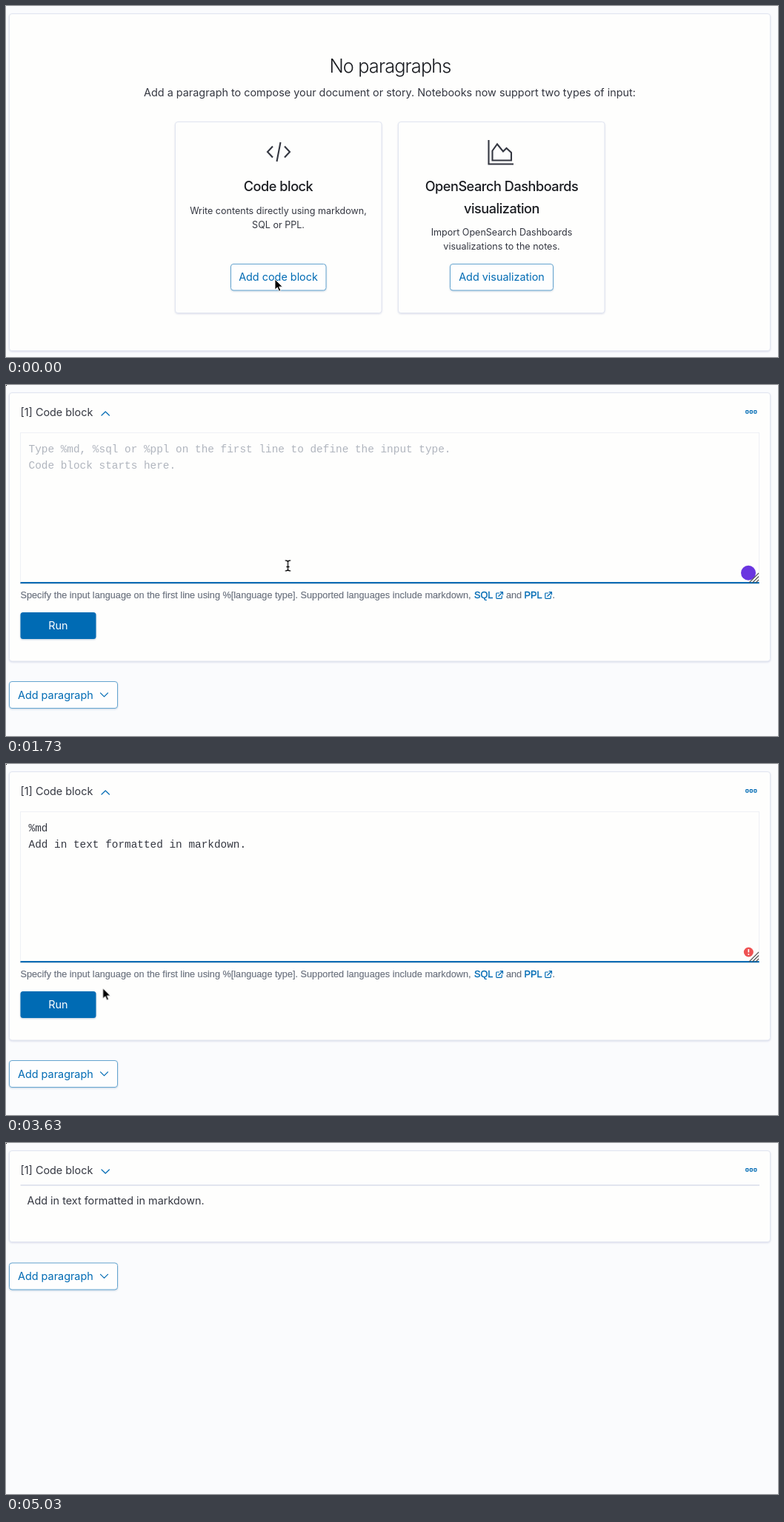
Recreate the animation shown at these times as an HTML page. Size 1042 by 474 pixels, loop 5.4 s.

```html
<!DOCTYPE html>
<html lang="en">
<head>
<meta charset="utf-8">
<title>Notebook code block</title>
<style>
  html, body { margin: 0; width: 100%; height: 100%; overflow: hidden; background: #fafbfd; }
  svg { display: block; width: 100%; height: 100%; }
  text { font: 14.4px Inter, sans-serif; font-optical-sizing: none; fill: #343741; }
  .mid { text-anchor: middle; }
  .title { font-size: 25.4px; font-weight: 300; letter-spacing: -.035em; fill: #1a1c21; }
  .head { font-size: 18.1px; font-weight: 500; letter-spacing: -.025em; fill: #1a1c21; }
  .small { font-size: 12.55px; }
  .help { font: 12.7px "Liberation Sans", Arial, sans-serif; fill: #69707d; stroke: #69707d; stroke-width: .15; }
  .link { fill: #006bb4; stroke: #006bb4; stroke-width: .4; }
  .blue { fill: #006bb4; }
  .code { font: 14.4px "Liberation Mono", "Courier New", monospace; }
  .panel { fill: #fefefd; stroke: #e1e5f0; filter: drop-shadow(0 1.5px 1px rgba(130, 135, 185, .28)); }
  .btn { fill: #fefefe; stroke: #66a5d0; filter: drop-shadow(0 1.5px 1px rgba(60, 110, 160, .28)); }
  .icon, .line { fill: none; stroke: #343741; stroke-width: 2.1; }
  .line { stroke: #006bb4; stroke-width: 1.2; stroke-linecap: round; stroke-linejoin: round; }

  /* One 5400 ms clock; 1% = 54 ms */
  .step, .flow { animation: 5400ms step-end infinite; }
  .flow { animation-timing-function: linear; }

  .intro { animation-name: intro; }
  .editor { animation-name: editor; }
  .result { animation-name: result; }
  @keyframes intro { 0% { opacity: 1 } 18.52%, 100% { opacity: 0 } }
  @keyframes editor { 0% { opacity: 0 } 18.52% { opacity: 1 } 81.85%, 100% { opacity: 0 } }
  @keyframes result { 0% { opacity: 0 } 81.85%, 100% { opacity: 1 } }
  .speck { animation-name: speck; }
  @keyframes speck { 0% { opacity: 0 } .55%, 100% { opacity: 1 } }

  .addLift { animation-name: addLift; }
  .addFill { animation-name: addFill; }
  .addText { animation-name: addText; }
  @keyframes addLift { 0%, 4.81% { transform: none } 8.5%, 100% { transform: translateY(-.8px) } }
  @keyframes addFill {
    0%, 4.81% { fill: #fefefe; filter: drop-shadow(0 1.5px 1px rgba(60, 110, 160, .28)) }
    8.5%, 100% { fill: #e6f0f8; filter: drop-shadow(0 3px 3px rgba(60, 110, 160, .32)) }
  }
  @keyframes addText { 0% { text-decoration-line: none } 4.81%, 100% { text-decoration-line: underline } }

  .runLift { animation-name: runLift; }
  .runFill { animation-name: runFill; fill: #006bb4; }
  .runText { animation-name: runText; fill: #fff; }
  @keyframes runLift { 0%, 68% { transform: none } 71%, 100% { transform: translateY(-.9px) } }
  @keyframes runFill {
    0%, 68% { fill: #006bb4; filter: drop-shadow(0 1.5px 1px rgba(40, 90, 150, .3)) }
    71%, 100% { fill: #005a98; filter: drop-shadow(0 3px 3px rgba(40, 90, 150, .4)) }
  }
  @keyframes runText { 0% { text-decoration-line: none } 68%, 100% { text-decoration-line: underline } }

  .focus { animation-name: focus; transform-origin: 19.5px 0; fill: #006bb4; }
  @keyframes focus {
    0% { transform: scaleX(0) } 19.6% { transform: scaleX(.0125) }
    21.48% { transform: scaleX(.45) } 22.5%, 100% { transform: none }
  }

  .hint { animation-name: hint; }
  .hint text { fill: #b0b5be; }
  @keyframes hint { 0% { opacity: 1 } 37.59%, 100% { opacity: 0 } }
  .key { fill: transparent; animation-name: key; }
  .key:nth-child(2) { animation-delay: 60ms; }
  .key:nth-child(3) { animation-delay: 120ms; }
  @keyframes key { 0% { fill: transparent } 37.59%, 100% { fill: #343741 } }
  .paste { animation-name: paste; }
  @keyframes paste { 0% { opacity: 0 } 51.11%, 100% { opacity: 1 } }

  .caret { fill: #30333a; animation-name: caretMove, caretBlink; }
  @keyframes caretMove {
    0% { transform: none }
    37.59% { transform: translate(8.6px, 0) }
    38.7% { transform: translate(17.3px, 0) }
    39.81% { transform: translate(25.9px, 0) }
    42.04% { transform: translate(0, 21.5px) }
    51.11%, 100% { transform: translate(294px, 21.5px) }
  }
  @keyframes caretBlink {
    0% { opacity: 1 } 28.3% { opacity: 0 } 37.59% { opacity: 1 }
    60.37% { opacity: 0 } 69.63% { opacity: 1 } 78.89%, 100% { opacity: 0 }
  }

  .badge { animation-name: badge; }
  .alert { animation-name: alert; }
  @keyframes badge { 0% { opacity: 0 } 23.15% { opacity: 1 } 59.26%, 100% { opacity: 0 } }
  @keyframes alert { 0% { opacity: 0 } 63.89%, 100% { opacity: 1 } }

  .pointer { animation-name: pointer; }
  @keyframes pointer {
    0%, 4.8% { transform: translate(363px, 369px) }
    5.9%, 15.37% { transform: translate(364px, 370.5px) }
    19.6%, 21.48% { transform: translate(374px, 362px) }
    29.63%, 32.96% { transform: translate(380.5px, 244px) }
    36.3%, 55.56% { transform: translate(309.5px, 144px) }
    62.96% { transform: translate(200px, 262px) }
    70.37%, 84.44% { transform: translate(80px, 332.5px) }
    92.59%, 100% { transform: translate(632px, -24px) }
  }
  .arrow { animation-name: arrow; }
  .hand { animation-name: hand; }
  .beam { animation-name: beam; }
  @keyframes arrow {
    0% { opacity: 1 } 4.81% { opacity: 0 } 18.52% { opacity: 1 } 27.8% { opacity: 0 }
    63.4% { opacity: 1 } 68% { opacity: 0 } 81.85%, 100% { opacity: 1 }
  }
  @keyframes hand {
    0% { opacity: 0 } 4.81% { opacity: 1 } 18.52% { opacity: 0 }
    68% { opacity: 1 } 81.85%, 100% { opacity: 0 }
  }
  @keyframes beam {
    0% { opacity: 0 } 27.8% { opacity: 1 } 37.59% { opacity: 0 }
    52.22% { opacity: 1 } 63.4%, 100% { opacity: 0 }
  }
</style>
</head>
<body>
<svg viewBox="0 0 1042 474">
  <defs>
    <g id="external" class="line">
      <path d="M4.5 2H1.5Q.8 2 .8 2.700V8.500Q.8 9.300 1.500 9.300H7.500Q8.300 9.300 8.300 8.500V5.800M3.800 6.300 9.500.700M6.200.700H9.500V4"/>
    </g>
    <g id="dots" class="line">
      <rect x="998.700" y="34.700" width="3.200" height="3.400" rx=".8"/>
      <rect x="1004.200" y="34.700" width="3.200" height="3.400" rx=".8"/>
      <rect x="1009.700" y="34.700" width="3.200" height="3.400" rx=".8"/>
    </g>
    <g id="addParagraph">
      <rect class="btn" x="4.500" y=".5" width="146" height="36" rx="3.500"/>
      <text class="blue" x="16" y="23.500">Add paragraph</text>
      <path class="line" d="M127.500 15.800l5 5 5-5"/>
    </g>
  </defs>

  <rect width="1042" height="474" fill="#fafbfd"/>

  <g class="step intro">
    <rect class="panel" x="4.500" y="10.500" width="1027" height="455" rx="3.500"/>
    <text class="mid title" x="518.500" y="89.500">No paragraphs</text>
    <text class="mid" x="518" y="121.500">Add a paragraph to compose your document or story. Notebooks now support two types of input:</text>

    <rect class="panel" x="228.500" y="156.500" width="278.500" height="258" rx="3.500"/>
    <path class="icon" d="M360 189.500l-7 7.500 7 7.500M376 189.500l7 7.500-7 7.500M370.500 184l-5 26"/>
    <text class="mid head" x="367.500" y="250">Code block</text>
    <text class="mid small" x="367.500" y="280.500">Write contents directly using markdown,</text>
    <text class="mid small" x="367.500" y="299.500">SQL or PPL.</text>
    <g class="flow addLift">
      <rect class="btn flow addFill" x="303.500" y="348.500" width="128.500" height="35.500" rx="3.500"/>
      <text class="mid blue step addText" x="367.500" y="371">Add code block</text>
    </g>

    <rect class="panel" x="529.500" y="156.500" width="278.500" height="258" rx="3.500"/>
    <path class="icon" d="M651.500 181v32.500h33.500M656.500 208.500v-13l6.500-9 8 10 4.500-4.500 6.500 6v10.500z"/>
    <text class="mid head" x="669" y="250">OpenSearch Dashboards</text>
    <text class="mid head" x="669" y="279.500">visualization</text>
    <text class="mid small" x="669" y="309.500">Import OpenSearch Dashboards</text>
    <text class="mid small" x="669" y="328.500">visualizations to the notes.</text>
    <rect class="btn" x="599.500" y="348.500" width="139" height="35.500" rx="3.500"/>
    <text class="mid blue" x="669" y="371">Add visualization</text>
  </g>

  <g class="step editor">
    <rect class="panel" x="4.500" y="10.500" width="1027" height="362.500" rx="3.500"/>
    <text x="19.500" y="42">[1] Code block</text>
    <path class="line" d="M129 41l5.200-5 5.200 5"/>
    <use href="#dots"/>

    <rect x="19.500" y="64.500" width="997" height="203.500" fill="#fefefd" stroke="#eef0f5"/>
    <path d="M19 268.300h998" stroke="#cdd2dc"/>
    <rect class="step focus" x="19.500" y="266" width="997" height="2"/>
    <g class="step hint">
      <text class="code" x="30.500" y="91">Type %md, %sql or %ppl on the first line to define the input type.</text>
      <text class="code" x="30.500" y="112.500">Code block starts here.</text>
    </g>
    <text class="code" x="30.500" y="91"><tspan class="step key">%</tspan><tspan class="step key">m</tspan><tspan class="step key">d</tspan></text>
    <text class="code step paste" x="30.500" y="112.500">Add in text formatted in markdown.</text>
    <rect class="step caret" x="30" y="78" width="1" height="17"/>

    <circle class="step badge" cx="1002" cy="253.700" r="10" fill="#6a35e0"/>
    <g class="step alert">
      <circle cx="1002.300" cy="254" r="6.500" fill="#ee5253"/>
      <path d="M1002.300 250v4.600M1002.300 256.300v1.700" stroke="#fff" stroke-width="1.700"/>
    </g>
    <path d="M1003 267l13-13M1007.500 267l8.500-8.500M1012 267l4-4" stroke="#555" stroke-width="1.100"/>

    <text class="help" x="19.500" y="287.500">Specify the input language on the first line using %[language type]. Supported languages include markdown,</text>
    <text class="help link" x="632" y="287.500">SQL</text>
    <use href="#external" x="661" y="279"/>
    <text class="help" x="675" y="287.500">and</text>
    <text class="help link" x="699.500" y="287.500">PPL</text>
    <use href="#external" x="727" y="279"/>
    <text class="help" x="737.500" y="287.500">.</text>

    <g class="flow runLift">
      <rect class="flow runFill" x="19.500" y="307" width="102" height="36" rx="3.500"/>
      <text class="mid step runText" x="70.300" y="330">Run</text>
    </g>
    <use href="#addParagraph" y="400"/>
  </g>

  <g class="step result">
    <rect class="panel" x="4.500" y="10.500" width="1027" height="123" rx="3.500"/>
    <text x="19.500" y="42">[1] Code block</text>
    <path class="line" d="M129 36l5.200 5 5.200-5"/>
    <use href="#dots"/>
    <path d="M19.500 57h997.500" stroke="#d9dcea" stroke-width="1.500"/>
    <text x="28.500" y="82.500">Add in text formatted in markdown.</text>
    <use href="#addParagraph" y="161.500"/>
  </g>

  <g class="flow pointer">
    <path class="step arrow" d="M0 0V14.200l3.300-3.100 2.200 5.100 2.400-1-2.200-5H10.300z" fill="#000" stroke="#fff" stroke-width=".9"/>
    <path class="step hand" d="M-1.500 1.500Q-1.500 0 0 0T1.500 1.500V6Q2 4.800 3.300 5.100T4.600 6.500Q5.100 5.500 6.200 5.900T7.300 7.300Q8 6.600 8.700 7.300T9.200 9V11.500Q9 13 7.800 14.500V16.500H.3V15Q-1.500 13.500-3 11T-5 8.200Q-5 6.800-3.500 7.200L-1.500 9.200zM1.700 11v3M4 11v3M6.200 11v3" fill="#fff" stroke="#000"/>
    <g class="step beam" fill="none">
      <path d="M-3.500-7Q0-7 0-5Q0-7 3.500-7M0-5V5M-3.500 7Q0 7 0 5Q0 7 3.500 7M-2 1.500H2" stroke="#fff" stroke-width="2.800"/>
      <path d="M-3.500-7Q0-7 0-5Q0-7 3.500-7M0-5V5M-3.500 7Q0 7 0 5Q0 7 3.500 7M-2 1.500H2" stroke="#000" stroke-width="1.300"/>
    </g>
  </g>
  <rect class="step speck" width="1" height="1"/>
</svg>
</body>
</html>
```
